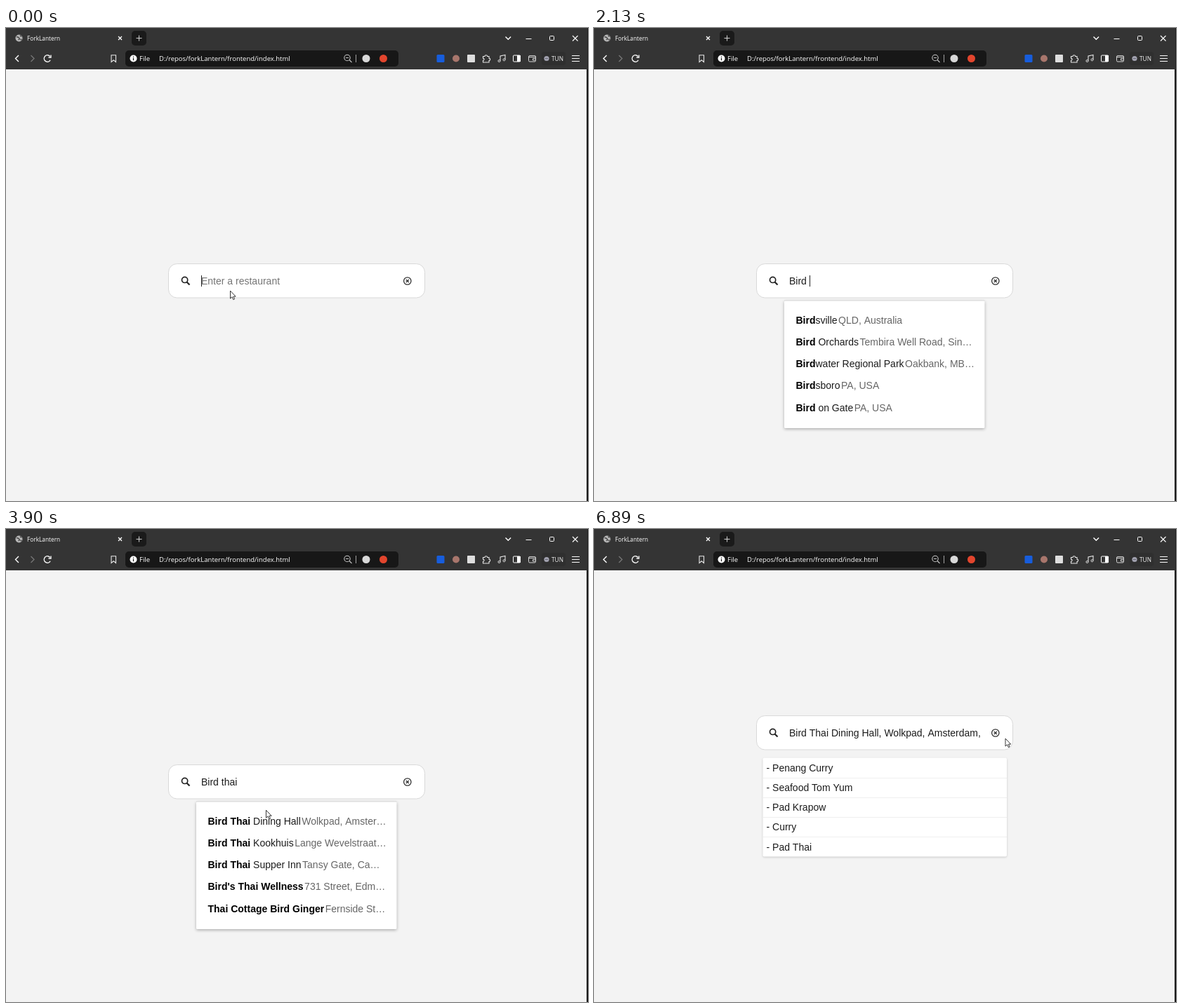
An HTML page with a canvas for the animation above (6.97 s loop, 829x675 px).

```html
<!DOCTYPE html>
<html lang="en">
<head>
<meta charset="utf-8">
<title>ForkLantern</title>
<style>
html, body { margin: 0; width: 100%; height: 100%; overflow: hidden; background: #f3f3f3; }
canvas { display: block; }
</style>
</head>
<body>
<canvas id="stage" width="829" height="675"></canvas>
<script>
const LOOP = 6970;
const ctx = document.getElementById('stage').getContext('2d');
const SANS = '"Liberation Sans", Arial, sans-serif';
const UI = '"Open Sans", "Noto Sans", sans-serif';
const PAGE = '14px ' + SANS, BOLD = 'bold 14px ' + SANS;
const SMALL = '500 8.3px ' + UI, ADDRESS = '500 9.5px ' + UI;

const CHOSEN = 'Bird Thai Dining Hall, Wolkpad, Amsterdam,';

// Each place: name, secondary text, bold length when the query is no prefix
const letterB = [['Bangladesh', ''], ['Barbados', ''], ['Bali', 'Indonesia'],
  ['Barcelona', 'Spain'], ['Bolivia', '']];
const letterBi = [['Birmingham', 'UK'], ['Bilbao', 'Spain'], ['Bihar', 'India'],
  ['Bielefeld', 'Germany'], ['Bicester', 'UK']];
const birds = [['Birdsville', 'QLD, Australia'],
  ['Bird Orchards', 'Tembira Well Road, Singapore'],
  ['Birdwater Regional Park', 'Oakbank, MB, Canada'],
  ['Birdsboro', 'PA, USA'], ['Bird on Gate', 'PA, USA']];
const thais = [['Bird Thai Dining Hall', 'Wolkpad, Amsterdam, Netherlands'],
  ['Bird Thai Kookhuis', 'Lange Wevelstraat, Amsterdam'],
  ['Bird Thai Supper Inn', 'Tansy Gate, Cambridge, UK'],
  ["Bird's Thai Wellness", '731 Street, Edmonton, AB', 20],
  ['Thai Cottage Bird Ginger', 'Fernside Street, Seattle', 24]];

const typed = [[0, ''], [1070, 'B'], [1320, 'Bi'], [1560, 'Bir'], [1630, 'Bird'],
  [2130, 'Bird '], [2280, 'Bird t'], [2450, 'Bird th'], [2700, 'Bird tha'],
  [2770, 'Bird thai'], [3990, CHOSEN]];
const menus = [[0, null], [1240, letterB, 'b'], [1490, letterBi, 'bi'],
  [1800, birds, 'bird'], [2530, thais, 'bird th'], [2940, thais, 'bird thai'], [3990, null]];
const dishes = ['Penang Curry', 'Seafood Tom Yum', 'Pad Krapow', 'Curry', 'Pad Thai'];

const latest = (keys, t) => keys.filter(k => k[0] <= t).pop();

function text(s, x, y, color, font) {
  ctx.font = font;
  ctx.fillStyle = color;
  ctx.fillText(s, x, y);
  return x + ctx.measureText(s).width;
}

function rect(x, y, w, h, fill) {
  ctx.fillStyle = fill;
  ctx.fillRect(x, y, w, h);
}

function box(x, y, w, h, r, fill, stroke) {
  ctx.beginPath();
  ctx.roundRect(x, y, w, h, r);
  if (fill) { ctx.fillStyle = fill; ctx.fill(); }
  if (stroke) { ctx.strokeStyle = stroke; ctx.lineWidth = 1; ctx.stroke(); }
}

function dot(x, y, r, fill) {
  ctx.beginPath();
  ctx.arc(x, y, r, 0, 7);
  ctx.fillStyle = fill;
  ctx.fill();
}

function lines(d, color, width = 1.2) {
  ctx.strokeStyle = color;
  ctx.lineWidth = width;
  ctx.stroke(new Path2D(d));
}

function ring(x, y, r, color, width, from = 0, to = 2 * Math.PI) {
  ctx.beginPath();
  ctx.arc(x, y, r, from, to);
  ctx.strokeStyle = color;
  ctx.lineWidth = width;
  ctx.stroke();
}

function shadowed(color, blur, dy, draw) {
  ctx.save();
  ctx.shadowColor = color;
  ctx.shadowBlur = blur;
  ctx.shadowOffsetY = dy;
  draw();
  ctx.restore();
}

function tabStrip() {
  dot(18.5, 14.5, 5, '#b9b9b9');
  lines('M15 12.5l3 1 1.5 2-2 1.5M20 10.5l2 2M20.5 17l2-1', '#4a4a4a', 1.5);
  text('ForkLantern', 30, 17.5, '#fff', SMALL);
  lines('M160 12l5 5m0-5l-5 5', '#fff', 1.3);
  box(179, 4, 21, 21, 5, '#1a1a1a');
  lines('M185.5 14.5h8m-4-4v8', '#d0d0d0', 1);
  lines('M711.5 12.5l3.8 3.8 3.8-3.8', '#fff', 1.4);
  lines('M740.5 15.5h8', '#fff', 1);
  box(774.5, 11.5, 6, 6, 1, null, '#fff');
  lines('M807 11l7.5 7.5m0-7.5l-7.5 7.5', '#fff', 1.1);
}

function toolbar() {
  lines('M18 39l-4.5 4.5 4.5 4.5', '#fff', 1.4);
  lines('M35.5 39l4.5 4.5-4.5 4.5', '#777', 1.3);
  ring(59, 43.5, 4.7, '#fff', 1.4, 0.5, 5.6);
  lines('M64 38.5v3.5h-3.5', '#fff', 1.3);
  lines('M150 38.8h6.5v9.7l-3.25-2.7-3.25 2.7z', '#e6e6e6', 1.1);

  box(170, 32, 389, 23, 5, '#171717');
  dot(181.5, 43.5, 5, '#fff');
  lines('M181.5 42.7v3.5M181.5 40.4v1.3', '#171717', 1.2);
  text('File', 190, 47, '#fff', ADDRESS);
  text('D:/repos/forkLantern/frontend/index.html', 218, 47, '#fff', ADDRESS);
  ring(486, 42.5, 4.2, '#c4c4c4', 1.1);
  lines('M484 42.5h4m1 3l3.5 3.5', '#c4c4c4', 1.1);
  lines('M498.5 38v11', '#a0a0a0', 1);
  dot(513, 43.5, 5.5, '#d8d8d8');
  dot(537.5, 43.5, 5.5, '#e2452d');

  box(613.5, 38, 11, 11, 1.5, '#175ddc');
  dot(641, 43.5, 5, '#a8766c');
  box(657, 38, 11, 11, 1, '#dedede');
  lines('M679.5 40.5h2.5a1.8 1.8 0 0 1 3.6 0h2.4v2.6a1.7 1.7 0 0 1 0 3.4v2.5h-8.5v-2.7a1.6 1.6 0 0 0 0-3.2z', '#e6e6e6', 1.1);
  lines('M704 46.5v-6.5l7-1.5v6.5', '#e6e6e6', 1.1);
  ring(702.5, 47, 1.5, '#e6e6e6', 1);
  ring(709.5, 45.3, 1.5, '#e6e6e6', 1);
  box(722.5, 39, 10, 9, 1, null, '#fff');
  box(728, 39, 5, 9, 0, '#fff');
  box(744.5, 39.5, 10, 8.5, 1.5, null, '#d6d6d6');
  lines('M745 41.5h9.5M754.5 43.5h-4v2.5h4', '#d6d6d6', 1);
  box(763, 34, 34, 19, 4, '#2f2f2f');
  dot(770, 43.5, 3.6, '#a2a2b0');
  lines('M768 43.5h4', '#666674', 1);
  text('TUN', 777, 46.5, '#f2f2f2', SMALL);
  lines('M806 39.5h11M806 43.5h11M806 47.5h11', '#fff', 1.2);
}

function searchField(t, dy) {
  ctx.save();
  ctx.translate(0, dy);
  box(231.5, 336.5, 365, 48.5, 12, '#fff', '#d9d9d9');
  ring(254.6, 359.4, 4.1, '#222', 1.7);
  lines('M257.5 362.5l4 4', '#222', 2.2);
  ring(571.8, 361, 5.2, '#333', 1.3);
  lines('M569.8 359l4 4m0-4l-4 4', '#333', 1.4);

  const value = latest(typed, t)[1];
  const end = value ? text(value, 278, 366, '#1c1c1c', PAGE) : 278;
  if (!value) text('Enter a restaurant', 278, 366, '#757575', PAGE);
  if (t < 500 || (t >= 990 && t < 3350)) rect(Math.round(end), 353, 1, 16, '#222');
  ctx.restore();
}

function fit(s, room) {
  ctx.font = PAGE;
  if (ctx.measureText(s).width <= room) return s;
  while (s && ctx.measureText(s + '…').width > room) s = s.slice(0, -1);
  return s + '…';
}

function suggestions(places, query) {
  shadowed('rgba(0,0,0,.3)', 4.5, 1.5, () => box(271, 389, 285.5, 182, 1.5, '#fff'));
  rect(271, 388.5, 285.5, 1, '#d9d9d9');
  places.forEach(([name, area, strong = 4], i) => {
    const y = Math.round(421.7 + 31.25 * i);
    const bold = name.toLowerCase().startsWith(query) ? query.length : strong;
    let x = text(name.slice(0, bold), 287.5, y, '#000', BOLD);
    x = text(name.slice(bold), x, y, '#1c1c1c', PAGE) + 1.5;
    if (area) text(fit(area, 542 - x), x, y, '#666', PAGE);
  });
}

function dishList() {
  shadowed('rgba(0,0,0,.18)', 3, 1, () => box(240.5, 326.5, 347.5, 141, 2, '#fff'));
  dishes.forEach((dish, i) => {
    const y = 326.5 + 28.2 * i;
    if (i) rect(240.5, Math.round(y), 347.5, 1, '#efefef');
    text('- ' + dish, 245.5, Math.round(y + 19.2), '#1c1c1c', PAGE);
  });
}

const mix = (a, b, u) => a.map((v, i) => v + (b[i] - v) * u);
const ease = u => (1 - Math.cos(Math.PI * u)) / 2;
const step = (t, start, gap, n) => Math.min(n, Math.floor((t - start) / gap)) / n;

function pointerAt(t) {
  const first = [319.5, 375], pick = [395, 413], rest = [478.5, 488];
  if (t < 80) return first;
  if (t < 3600) return null;
  if (t < 4320) return mix([324, 379], pick, ease(step(t, 3600, 78, 5)));
  if (t < 6270) return mix(pick, rest, ease(step(t, 4245, 75, 5)));
  return mix([487.5, 484], [586, 299], ease(step(t, 6270, 77.5, 8)));
}

function pointer([x, y]) {
  ctx.save();
  ctx.translate(x, y);
  const arrow = new Path2D('M0 0v11l2.6-2.3 1.7 3.9 1.8-.8-1.7-3.7h3.3z');
  ctx.fillStyle = '#fff';
  ctx.fill(arrow);
  ctx.strokeStyle = '#222';
  ctx.lineWidth = 0.9;
  ctx.stroke(arrow);
  ctx.restore();
}

function draw(t) {
  rect(0, 0, 829, 675, '#f3f3f3');
  rect(0, 0, 829, 59, '#343434');
  rect(827, 59, 2, 616, '#1c1c1c');
  rect(828, 0, 1, 59, '#1c1c1c');
  tabStrip();
  toolbar();

  const found = t >= 5370;
  searchField(t, found ? -70 : 0);
  const [, places, query] = latest(menus, t);
  if (places) suggestions(places, query);
  if (found) dishList();
  const at = pointerAt(t);
  if (at) pointer(at);
}

const start = performance.now();
function tick() {
  draw((performance.now() - start) % LOOP);
  requestAnimationFrame(tick);
}
tick();
</script>
</body>
</html>
```
